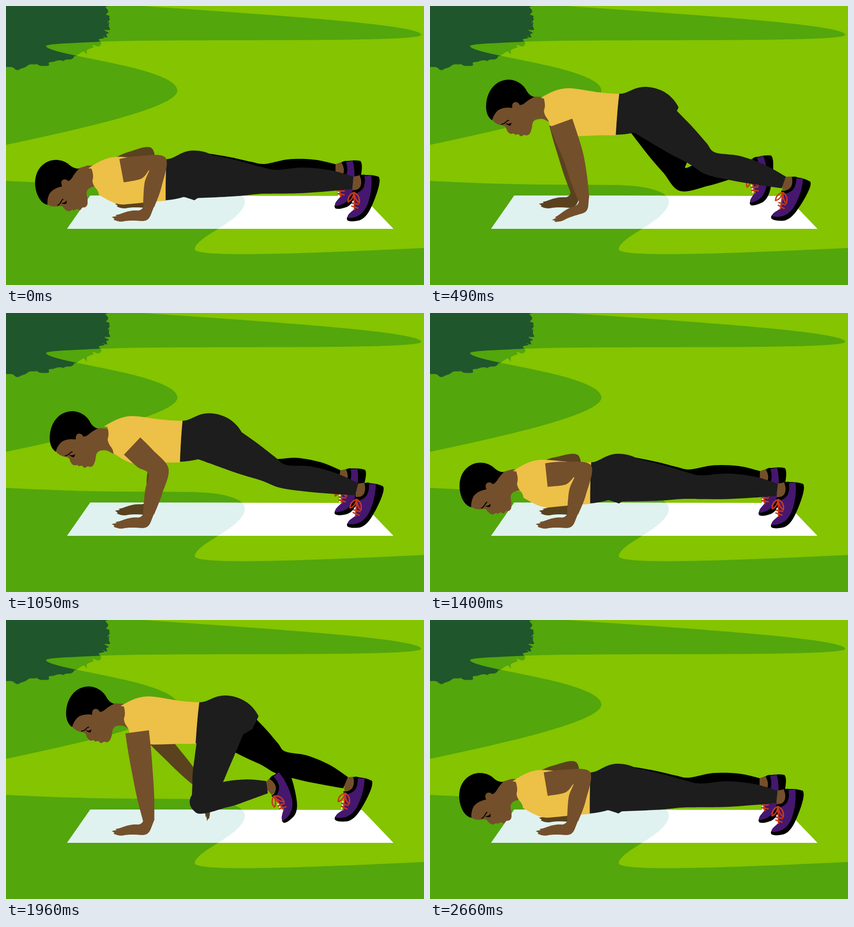
Animation of 917x611 px, one loop 2730 ms. Source, as an HTML page:

```html
<!DOCTYPE html>
<html lang="en">
<head>
<meta charset="utf-8">
<title>Push-up with toe tap</title>
<style>
html, body { margin: 0; width: 100%; height: 100%; overflow: hidden; background: #84c400; }
svg { display: block; width: 100vw; height: 100vh; }
</style>
</head>
<body>
<svg viewBox="0 0 917 611">
  <defs>
    <path id="hill" d="M0 0H300C560 18 911 40 911 63C911 82 350 70 190 79C130 82 88 83 88 88C92 108 374 134 376 185C376 222 170 268 0 304Z"/>
    <path id="lawn" d="M0 383C200 393 300 391 400 392C470 392 524 405 524 428C524 470 414 505 414 533C418 553 700 540 917 530V611H0Z"/>
    <path id="mat" d="M185 415L781 416L850 488L134 488Z"/>
    <path id="tree"/>
    <clipPath id="inHill"><use href="#hill"/></clipPath>
    <clipPath id="inLawn"><use href="#lawn"/></clipPath>
    <path id="hand" d="M301 436Q302 446 290 448C275 447 265 450 249 456L240 458L243 460L232 462L238 466L236 468Q246 473 256 472C268 469 285 470 300 471Q312 471 317 459L326 436Z"/>
    <g id="shoe">
      <path fill="#744f2b" d="M768 374L788 372Q793 388 787 402L768 403Z"/>
      <path d="M787 373Q793 370 800 373Q816 374 828 380Q831 385 827 397C823 410 812 432 803 446Q790 467 775 470Q755 472 749 467Q746 462 752 457L772 440L766 404Q780 405 786 396Q791 386 787 373Z"/>
      <path fill="#45176f" d="M797 375L812 375C812 395 807 416 797 437C788 453 775 465 751 462C747 456 759 450 767 444L769 412Q789 408 794 396Q798 386 797 375Z"/>
      <path fill="none" stroke="#fff" stroke-width="3" stroke-dasharray="3 4" d="M766 426L762 446"/>
      <path fill="none" stroke="#c53a1b" stroke-width="3" stroke-linecap="round" stroke-linejoin="round" d="M770 408Q755 413 755 427Q766 424 770 408Q783 416 779 432Q770 424 770 408L767 445M763 431L777 435M762 437L775 443"/>
    </g>
  </defs>
  <rect width="917" height="611" fill="#84c400"/>
  <use href="#hill" fill="#53a60b"/>
  <use href="#tree" fill="#53a60b"/>
  <g clip-path="url(#inHill)"><use href="#tree" fill="#1f562b"/></g>
  <use href="#lawn" fill="#53a60b"/>
  <use href="#mat" fill="#fff"/>
  <g clip-path="url(#inLawn)"><use href="#mat" fill="#dff2ef"/></g>

  <use id="farShoe" href="#shoe"/>
  <path id="farLeg"/>
  <g fill="#5a421f"><path id="farArm"/><use id="farHand" href="#hand"/></g>
  <use id="nearShoe" href="#shoe"/>
  <path id="nearLeg" fill="#1d1d1d"/>
  <path id="pelvis" fill="#1d1d1d" d="M381 245C402 245 412 228 441 228C476 229 500 247 513 271L500 300L440 337Q425 331 417 329Q398 334 376 335Z"/>
  <g id="head">
    <path fill="#744f2b" d="M104 310Q112 320 125 322Q132 323 134 326Q136 334 140 338Q143 342 150 340Q153 339 154 343Q160 341 163 342Q164 346 169 346Q174 341 178 344Q186 345 189 335Q192 328 192 321Q194 309 204 308Q212 307 218 309L232 316L240 300L236 268L216 260L195 259L150 262L110 285Z"/>
    <path d="M104 311C92 303 90 287 91 275C94 243 114 222 141 222C160 223 174 234 180 247Q186 257 196 260Q184 266 176 273Q168 279 164 277Q162 271 154 271Q147 273 148 284Q128 281 116 290Q107 299 104 311Z"/>
    <path fill="none" stroke="#000" stroke-width="2" d="M124 320Q130 319 134 315T141 311"/>
    <path d="M133 317Q140 321 147 316L144 323Q139 322 136 320Z"/>
  </g>
  <path id="shirt" fill="#edc047" d="M210 259C225 250 244 237 270 236C302 236 330 246 382 245C379 275 378 305 377 336Q358 337 345 337Q320 339 285 341C265 341 248 328 231 318Q231 310 224 302Q218 294 218 286Q222 276 217 260Z"/>
  <g fill="#744f2b"><path id="nearArm"/><use id="nearHand" href="#hand"/></g>
</svg>
<script>
const LOOP = 2730, STEP = 70, REPS = [672, 2015];
const $ = id => document.getElementById(id);
const clamp = x => Math.max(0, Math.min(1, x));
const mix = (a, b, t) => a.map((v, i) => v + (b[i] - v) * t);
const add = (a, b) => a.map((v, i) => v + b[i]);
const along = (a, b, px) => mix(a, b, px / Math.hypot(b[0] - a[0], b[1] - a[1]));
const place = ([x, y, a], ox, oy) => `translate(${x} ${y}) rotate(${a}) translate(${-ox} ${-oy})`;

function turn([x, y], [cx, cy], deg) {
  const a = deg * Math.PI / 180, c = Math.cos(a), s = Math.sin(a);
  return [cx + (x - cx) * c - (y - cy) * s, cy + (x - cx) * s + (y - cy) * c];
}

// Curve through all points, starting with a line to the first
function spline(p) {
  const at = i => p[Math.max(0, Math.min(p.length - 1, i))];
  const bend = (b, a, c) => b.map((v, k) => v + (c[k] - a[k]) / 6);
  return 'L' + p[0] + p.slice(1).map((c, i) =>
    'C' + [bend(at(i), at(i - 1), c), bend(c, at(i + 2), at(i)), c]).join('');
}

// Outline around a centre line of [x, y, width]
function limb(line) {
  const side = sign => line.map(([x, y, w], i) => {
    const a = line[Math.max(0, i - 1)], b = line[Math.min(line.length - 1, i + 1)];
    const dx = b[0] - a[0], dy = b[1] - a[1], n = sign * w / 2 / Math.hypot(dx, dy);
    return [x + dy * n, y - dx * n];
  });
  return (spline(side(1)) + spline(side(-1).reverse())).replace('L', 'M') + 'Z';
}

const disc = ([x, y], r) => `M${x - r} ${y}a${r} ${r} 0 1 1 ${2 * r} 0a${r} ${r} 0 1 1 ${-2 * r} 0Z`;

// Joint of two bones that reach from a to b, bent towards the feet
function elbow(a, b, upper, lower) {
  const dx = b[0] - a[0], dy = b[1] - a[1], d = Math.hypot(dx, dy);
  if (d >= upper + lower) return mix(a, b, upper / (upper + lower));
  const m = (upper ** 2 - lower ** 2 + d * d) / (2 * d), h = Math.sqrt(upper ** 2 - m * m);
  return [a[0] + (dx * m + dy * h) / d, a[1] + (dy * m - dx * h) / d];
}

function drawArm(name, shoulder, lift, reach) {
  const far = name === 'far', size = far ? .85 : 1;
  const floor = far ? [320, 409] : [313, 438];
  const raised = add([394, far ? 370 : 385], [45 * reach, -15 * reach]);
  const wrist = mix(floor, raised, lift);
  const bones = far ? [104, 84] : [122, 94];
  const joint = elbow(shoulder, wrist, ...bones);
  const sleeve = along(shoulder, joint, 42);
  const widths = [52, 50, 45, 38, 25];
  const line = [sleeve, mix(sleeve, joint, .5), joint, mix(joint, wrist, .5), wrist];
  $(name + 'Arm').setAttribute('d', limb(line.map((p, i) => [...p, widths[i] * size])));
  $(name + 'Hand').setAttribute('transform',
    `translate(${wrist}) rotate(${-63 * lift - 40 * reach}) scale(1 ${1 - .35 * lift}) translate(-313 -438)`);
}

function drawLeg(name, u, hip, brace, lift, reach) {
  const far = name === 'far', swing = 20 * reach;
  const flat = -6.6 + 9.5 * u;
  const tilt = flat + (9 - flat) * brace - (far ? 8 : 0);
  const toe = far ? [743, 438] : [770, 467];
  const ankleDown = turn(add(toe, [10, -79]), toe, tilt);
  const [ax, ay, angle] = mix([...ankleDown, tilt],
    [...turn([614, 335], hip, swing), swing - 54], lift);

  const plank = [592 + 32 * u - 11 * u * u, 385 - 62 * u + 30 * u * u];
  const kneeDown = add(mix(plank, [625, 325], brace), far ? [-22, -13] : [0, 0]);
  const knee = add(mix(kneeDown, turn([472, 405], hip, swing), lift),
    [0, 25 * Math.sin(Math.PI * lift)]);
  const cuff = along([ax, ay], knee, 10);
  const calf = t => add(mix(knee, cuff, t), [0, -4]);

  $(name + 'Leg').setAttribute('d', limb([
    [...hip, 104], [...mix(hip, knee, .5), 80], [...mix(hip, knee, .8), 60], [...knee, 52],
    [...calf(.35), 56], [...calf(.7), 46], [...cuff, 27]]) + disc(knee, 25));
  $(name + 'Shoe').setAttribute('transform', place([ax, ay, angle], 780, 388));
}

function draw(ms) {
  const t = Math.floor((ms % LOOP) / STEP) * STEP;
  const rep = t < 1344 ? 0 : 1;
  const d = Math.abs(t - REPS[rep]);
  // u: 0 at the floor, 1 at the top; a parabola softly stopped at the floor
  const fall = .0005 * d * d / 197;
  const u = 1 - (fall ** -20 + 1) ** -.05;
  const tap = Math.min(1, clamp((250 - d) / 152) ** 1.5);
  const reach = clamp(1 - (d / 98) ** 2);

  const hem = [352 + 25 * u + 48 * u * u, 336 - 157 * u], lean = 4 * u - 2;
  const onBody = (x, y) => turn(add(hem, [x - 382, y - 245]), hem, lean);
  const neck = [177 + 20 * u + 50 * u * u, 377 - 170 * u + 40 * u * (1 - u)];
  const body = place([...hem, lean], 382, 245);
  $('shirt').setAttribute('transform', body);
  $('pelvis').setAttribute('transform', body);
  $('head').setAttribute('transform', place([...neck, -20 * clamp(1 - u / .6)], 205, 285));

  // the near hand meets the far foot, then the far hand the near foot
  const shoulder = onBody(241, 273), hip = onBody(437, 281);
  ['near', 'far'].forEach((name, i) => {
    const mine = i === rep ? 1 : 0, other = 1 - mine;
    drawArm(name, shoulder, tap * mine, reach * mine);
    drawLeg(name, u, hip, tap * mine, tap * other, reach * other);
  });
}

function growTree() {
  let seed = 7;
  const rnd = () => (seed = seed * 16807 % 2147483647) / 2147483647 - .5;
  const edge = Array.from({ length: 52 }, (_, i) => {
    const t = i / 51, s = 1 - t;
    const x = 218 * s ** 3 + 750 * s * s * t + 450 * s * t * t;
    const y = 285 * s * s * t + 375 * s * t * t + 137 * t ** 3;
    return [x + 14 * rnd(), y + 11 * rnd()];
  });
  $('tree').setAttribute('d', 'M0 0L224 0' + spline(edge) + 'L0 137Z');
}

let start;
function tick(now) {
  start ??= now;
  draw(now - start);
  requestAnimationFrame(tick);
}
growTree();
draw(0);
requestAnimationFrame(tick);
</script>
</body>
</html>
```
